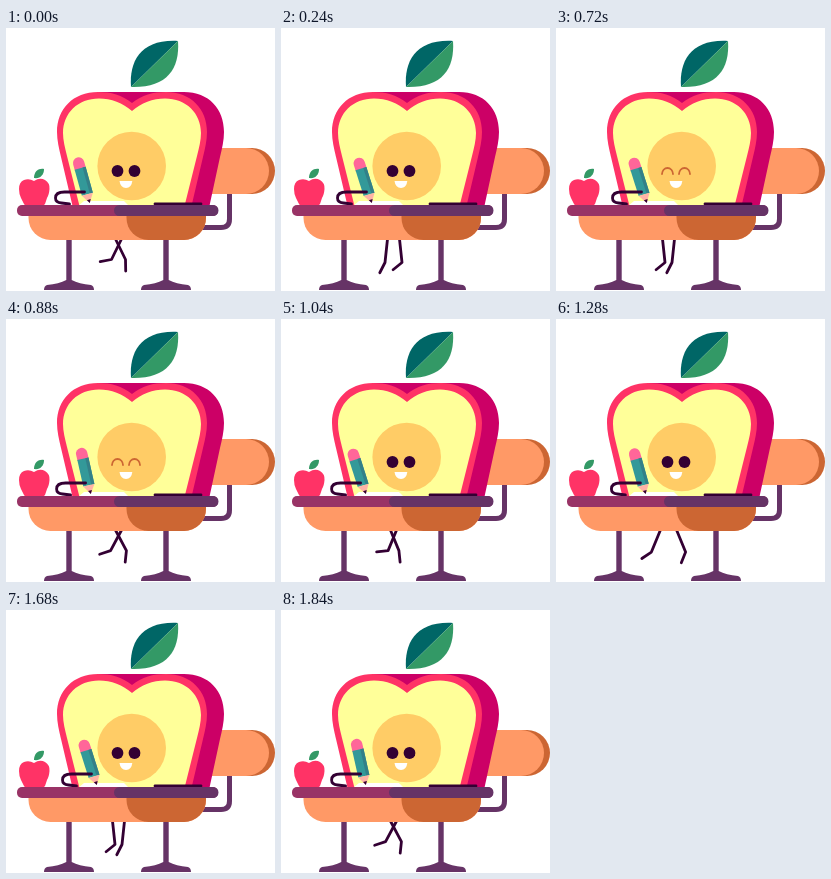
An HTML page that plays this animation: 269x263 px, repeating every 1920 ms.

```html
<!DOCTYPE html>
<html lang="en">
<head>
<meta charset="utf-8">
<title>Apple at its desk</title>
<style>
html, body { margin: 0; width: 100%; height: 100%; overflow: hidden; background: #fff; }
svg { display: block; width: 100%; height: 100%; }
.limb { fill: none; stroke: #330033; stroke-width: 2.8; stroke-linecap: round; stroke-linejoin: round; }
</style>
</head>
<body>
<svg viewBox="0 0 269 263">
  <!-- chair back and its bar -->
  <path d="M223.500 160V191Q223.500 199.500 215 199.500H196" fill="none" stroke="#663366" stroke-width="5"/>
  <rect x="160" y="120" width="109" height="46" rx="23" fill="#cc6633"/>
  <rect x="160" y="120" width="103" height="46" rx="23" fill="#ff9966"/>

  <!-- apple -->
  <path d="M92 64H178C203 64 218 81 218 104C218 112 216 121 214 129L203 180H100Z" fill="#cc0066"/>
  <path d="M126 75C136 67 147 64 160 64C185 64 201 81 201 104C201 112 199 121 197 129L185 180H67L55 129C53 121 51 112 51 104C51 81 67 64 92 64C105 64 116 67 126 75Z" fill="#ff3366"/>
  <path d="M126 83C135 75 147 70.500 159 70.500C180 70.500 195 85 195 105C195 112 193 120 191 128L178 180H74L61 128C59 120 57 112 57 105C57 85 72 70.500 93 70.500C105 70.500 117 75 126 83Z" fill="#ffff99"/>
  <circle cx="125.700" cy="138" r="34.300" fill="#ffcc66"/>
  <path d="M125 59C123 33 135 11 172 13Z" fill="#006666"/>
  <path d="M125 59C160 60 174 42 172 13Z" fill="#339966"/>

  <!-- face -->
  <g id="open" fill="#330033"><circle cx="111.500" cy="143" r="5.900"/><circle cx="128.500" cy="143" r="5.900"/></g>
  <path id="shut" d="M106 146a5.500 6 0 0 1 11 0M123 146a5.500 6 0 0 1 11 0" fill="none" stroke="#cc6633" stroke-width="1.800" stroke-linecap="round"/>
  <path d="M113.500 153H126.300Q125.500 160 120 160T113.500 153Z" fill="#fff"/>

  <!-- paper, resting arm, pencil -->
  <path d="M78 173H118L123 178H72Z" fill="#fff"/>
  <path d="M149 176H195" class="limb"/>
  <g id="pencil">
    <path d="M-5.700 -34V-40.500a5.700 5.700 0 0 1 11.400 0V-34Z" fill="#ff6699"/>
    <path d="M-5.700 -35H5.700V-8H-5.700Z" fill="#339999"/>
    <path d="M2.500 -35H5.700V-8H2.500Z" fill="#338088"/>
    <path d="M-5.700 -8H5.700L0 1Z" fill="#ffb3a6"/>
    <path d="M-2 -2.500H2L0 1Z" fill="#330033"/>
  </g>
  <path id="arm" class="limb"/>

  <!-- small apple -->
  <path d="M28 153Q34 149 39 152Q44 155 43.500 161Q43 167 41 170L39 176Q36 180 32 178Q28 180 24 178Q20 180 18 176L15 170Q13 166 13 161Q13 154 18 152Q23 150 28 153Z" fill="#ff3366"/>
  <path d="M28 150C28 143 33 140 38 141C38 147 34 151 28 150Z" fill="#339966"/>

  <!-- dangling legs, then desk -->
  <path id="legL" class="limb"/>
  <path id="legR" class="limb"/>
  <g fill="#663366">
    <path id="stand" d="M60.300 208H65.700V252Q73 256 85 257Q88 258 88 262H38Q38 258 41 257Q53 256 60.300 252Z"/>
    <use href="#stand" x="97"/>
  </g>
  <path d="M22.500 187H200V190A22 22 0 0 1 178 212H44.500A22 22 0 0 1 22.500 190Z" fill="#ff9966"/>
  <path d="M120.500 187H200V190A22 22 0 0 1 178 212H142.500A22 22 0 0 1 120.500 190Z" fill="#cc6633"/>
  <rect x="11" y="177" width="201" height="11" rx="5" fill="#993366"/>
  <path d="M108 182.500a5.500 5.500 0 0 1 5.500 -5.500H207a5.500 5.500 0 0 1 0 11H113.500a5.500 5.500 0 0 1 -5.500 -5.500Z" fill="#663366"/>
</svg>
<script>
const LOOP = 1920, STEP = 80, SWING = 960, STROKE = 480;
const $ = id => document.getElementById(id);
const turn = (t, period) => t / period * 2 * Math.PI;

// Cosine that lingers at both ends.
function wave(phase) {
  const c = Math.cos(phase);
  return c * (1.5 - 0.5 * c * c);
}

// Both legs share one swing; the knee bends more on the way forward.
function drawLeg(id, x, phase) {
  const w = wave(phase), s = Math.sin(phase);
  const kneeX = x + 13 * w - 2.5 * s, kneeY = 234.5 - 3 * w * w;
  const bend = (39 - 40 * w - 12 * s) * Math.PI / 180;
  const footX = kneeX - 11.5 * Math.sin(bend), footY = kneeY + 11.5 * Math.cos(bend);
  $(id).setAttribute("d", `M${x + 3 * w} 211L${kneeX} ${kneeY}L${footX} ${footY}`);
}

function drawWriting(t) {
  const p = turn(t, STROKE);
  const tip = 87 - 3.5 * wave(p);
  const top = 74.5 - 3.5 * Math.cos(p - 0.7);
  const tilt = Math.atan2(top - tip, 42) * 180 / Math.PI;
  $("pencil").setAttribute("transform", `translate(${tip} 174) rotate(${tilt})`);
  const x = tip - 34;
  $("arm").setAttribute("d",
    `M${x + 29} 164H${x + 9}Q${x} 164 ${x} 170Q${x} 174.500 ${x + 6} 175L${x + 14} 176`);
}

function draw(t) {
  const swing = turn(t, SWING);
  drawLeg("legL", 106.5, swing);
  drawLeg("legR", 118.5, swing + Math.PI);
  drawWriting(t);
  const smiling = t >= 640 && t < 960;
  $("open").style.display = smiling ? "none" : "";
  $("shut").style.display = smiling ? "" : "none";
}

const start = performance.now();
function tick() {
  const t = (performance.now() - start) % LOOP;
  draw(Math.floor(t / STEP) * STEP);
  requestAnimationFrame(tick);
}
tick();
</script>
</body>
</html>
```
